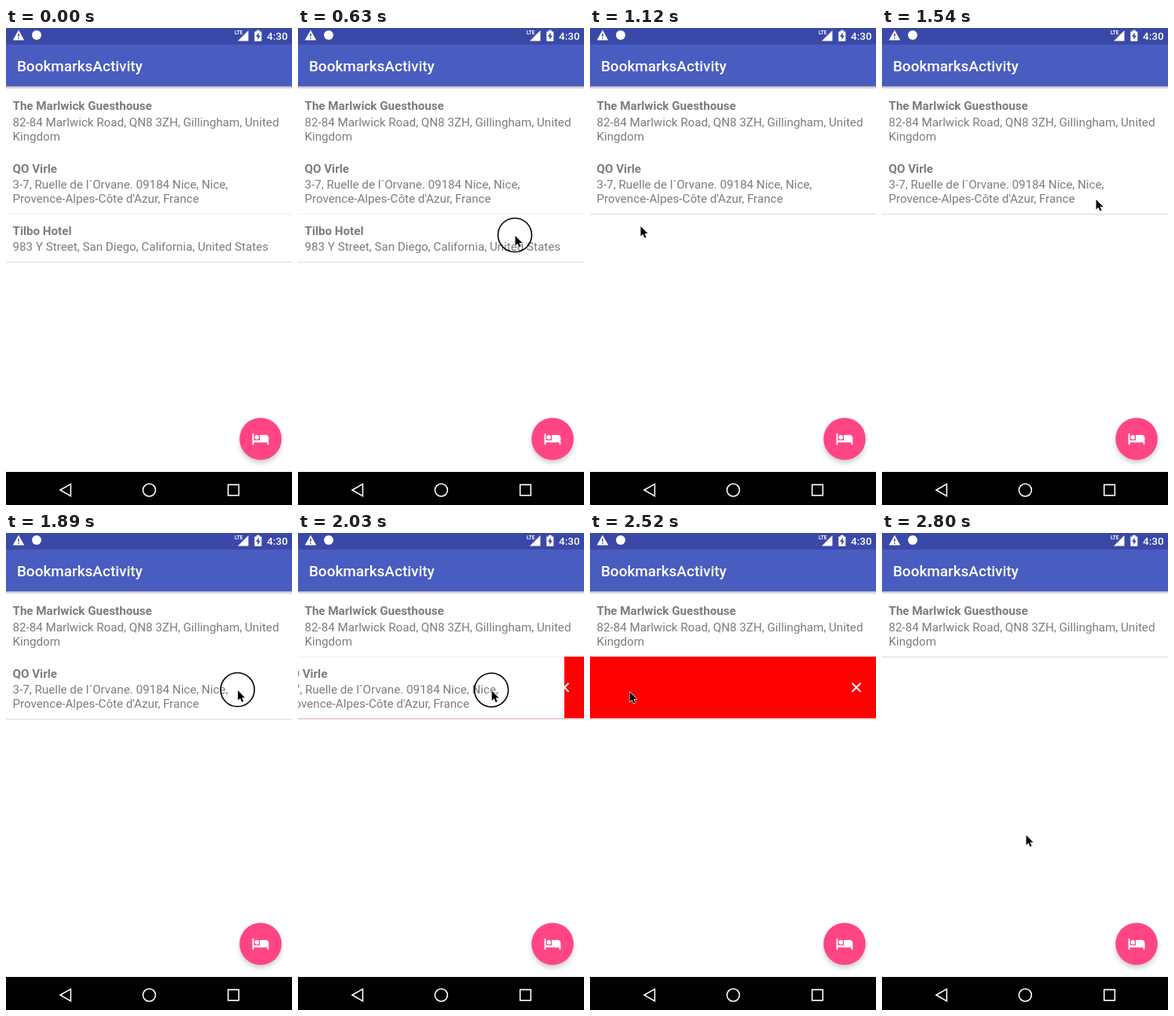
Write an HTML page that moves like this. It is 364 px wide and 606 px high and loops after 2.87 s.

```html
<!DOCTYPE html>
<html lang="en">
<head>
<meta charset="utf-8">
<title>Bookmarks</title>
<style>
  html, body { margin: 0; width: 100%; height: 100%; overflow: hidden; background: #fff; }
  svg { display: block; width: 364px; height: 606px; font: 15.17px Roboto, sans-serif; }
  .name { font-weight: 700; }
  .row text { fill: #7c7c7c; }
  .divider { fill: #dadada; }
</style>
</head>
<body>
<svg viewBox="0 0 364 606">
  <defs>
    <linearGradient id="barShade" x2="0" y2="1">
      <stop stop-color="#000" stop-opacity=".3"/>
      <stop offset="1" stop-color="#000" stop-opacity="0"/>
    </linearGradient>
    <filter id="soft" x="-30%" y="-30%" width="160%" height="160%">
      <feGaussianBlur stdDeviation="3"/>
    </filter>
  </defs>
  <rect width="364" height="606" fill="#fff"/>
  <g id="list"></g>

  <rect y="74" width="364" height="4" fill="url(#barShade)"/>
  <rect width="364" height="74" fill="#495cc0"/>
  <rect width="364" height="21" fill="#3a49a7"/>
  <text x="13.9" y="55.3" fill="#fff" font-size="18.96" font-weight="500">BookmarksActivity</text>

  <g fill="#fff">
    <path d="M16 2.5 23.3 15.5H8.7Z"/>
    <path d="M15.3 7h1.5v4h-1.5zM15.3 12.3h1.5v1.5h-1.5z" fill="#3a49a7"/>
    <circle cx="39" cy="9" r="6"/>
    <text x="291" y="8" font-size="6.3" font-weight="700">LTE</text>
    <path d="M308.5 3V16.5H295Z"/>
    <path d="M316.3 4.4h2.5V2.8h4V4.4h2.5V16.8h-9z"/>
    <path d="M321.7 5.7 318 11.1h2.3v4l3.5-5.4h-2.1z" fill="#3a49a7"/>
    <text x="332" y="15" font-size="13.5" font-weight="500">4:30</text>
  </g>

  <circle cx="324" cy="526" r="26.5" opacity=".2" filter="url(#soft)"/>
  <circle cx="324" cy="522" r="26.8" fill="#ff4586"/>
  <path transform="translate(312.6 510.4) scale(.948)" fill="#fff"
    d="M7 13c1.66 0 3-1.34 3-3S8.66 7 7 7s-3 1.34-3 3 1.34 3 3 3zm12-6h-8v7H3V5H1v15h2v-3h18v3h2v-9c0-2.21-1.79-4-4-4z"/>

  <rect y="564" width="364" height="42"/>
  <g fill="none" stroke="#fff" stroke-width="1.6">
    <path d="M69 587 82.4 579.3V594.7Z"/>
    <circle cx="182.3" cy="587" r="8"/>
    <rect x="282.7" y="580.2" width="13.6" height="13.6"/>
  </g>

  <g id="pointer">
    <circle id="ring" r="21.5" fill="none" stroke="#000" stroke-width="1.6"/>
    <path transform="translate(.5 1) scale(.88)" stroke="#fff" stroke-width="1.4"
      paint-order="stroke" stroke-linejoin="round"
      d="M0 0V14.2L3.3 11.2 5.7 16.6 8 15.6 5.7 10.3H10.2Z"/>
  </g>
</svg>
<script>
const STEP = 70, STEPS = 41, WIDTH = 364;
const SLOP = 20, LAG = .3;
const $ = id => document.getElementById(id);

const rows = [
  { name: "The Marlwick Guesthouse",
    lines: ["82-84 Marlwick Road, QN8 3ZH, Gillingham, United", "Kingdom"] },
  { name: "QO Virle",
    lines: ["3-7, Ruelle de l´Orvane. 09184 Nice, Nice,", "Provence-Alpes-Côte d'Azur, France"],
    press: 25, drop: 35 },
  { name: "Tilbo Hotel",
    lines: ["983 Y Street, San Diego, California, United States"],
    press: 8, drop: 14 }
];

// The pointer eases between these stops
const stops = [
  { at: 1, x: 306, y: 574 },
  { at: 8, x: 276, y: 263 },
  { at: 9.5, x: 276, y: 263 },
  { at: 16, x: 64, y: 251 },
  { at: 22, x: 272, y: 217 },
  { at: 25, x: 303, y: 199 },
  { at: 25.9, x: 303, y: 199 },
  { at: 36, x: 50, y: 201 },
  { at: 40, x: 183, y: 383 }
];

const ease = u => u * u * (3 - 2 * u);

function pointerAt(step) {
  const i = Math.max(1, stops.findIndex(s => s.at >= step));
  const a = stops[i - 1], b = stops[i];
  const u = ease(Math.max(0, (step - a.at) / (b.at - a.at)));
  return { x: a.x + (b.x - a.x) * u, y: a.y + (b.y - a.y) * u };
}

// The row trails the pointer, then flies off one step after release
function swipeAt({ press, drop }, step) {
  if (!press || step < press) return 0;
  if (step > drop) return WIDTH + 4;
  return Math.max(0, pointerAt(press).x - pointerAt(step - LAG).x - SLOP);
}

function buildRow({ name, lines }, top) {
  const h = 43.3 + 18 * lines.length, base = top + 26.4, cross = top + h / 2 - .5;
  const address = lines.map((s, i) => `<text x="8.5" y="${base + 20.3 + i * 18}">${s}</text>`).join("");
  $("list").insertAdjacentHTML("beforeend", `<g class="row">
    <rect class="divider" y="${Math.floor(top + h)}" width="${WIDTH}" height="1"/>
    <g class="back">
      <rect y="${top}" width="${WIDTH}" height="${h - 1}" fill="#f00"/>
      <path d="M333.5 ${cross - 5.5}l11 11m0-11l-11 11" stroke="#fff" stroke-width="1.9"/>
    </g>
    <g class="front">
      <rect y="${top}" width="${WIDTH + 2.5}" height="${h - 1}" fill="#fff"/>
      <text class="name" x="8.5" y="${base}">${name}</text>${address}
    </g>
  </g>`);
  return top + h;
}

rows.reduce((top, row) => buildRow(row, top), 77.8);
rows.forEach((row, i) => {
  row.el = $("list").children[i];
  row.back = row.el.querySelector(".back");
  row.front = row.el.querySelector(".front");
});

const show = (el, on) => { el.style.display = on ? "" : "none"; };

function draw(step) {
  for (const row of rows) {
    const dx = swipeAt(row, step);
    show(row.el, !row.drop || step < row.drop + 2);
    show(row.back, dx > 0);
    row.front.setAttribute("transform", `translate(${-dx} 0)`);
  }
  const { x, y } = pointerAt(step);
  $("pointer").setAttribute("transform", `translate(${x} ${y})`);
  show($("pointer"), step > 0);
  show($("ring"), rows.some(r => step >= r.press && step < r.drop));
}

const start = performance.now();
function tick(now) {
  draw(Math.floor(Math.max(0, now - start) / STEP) % STEPS);
  requestAnimationFrame(tick);
}
draw(0);
requestAnimationFrame(tick);
</script>
</body>
</html>
```
